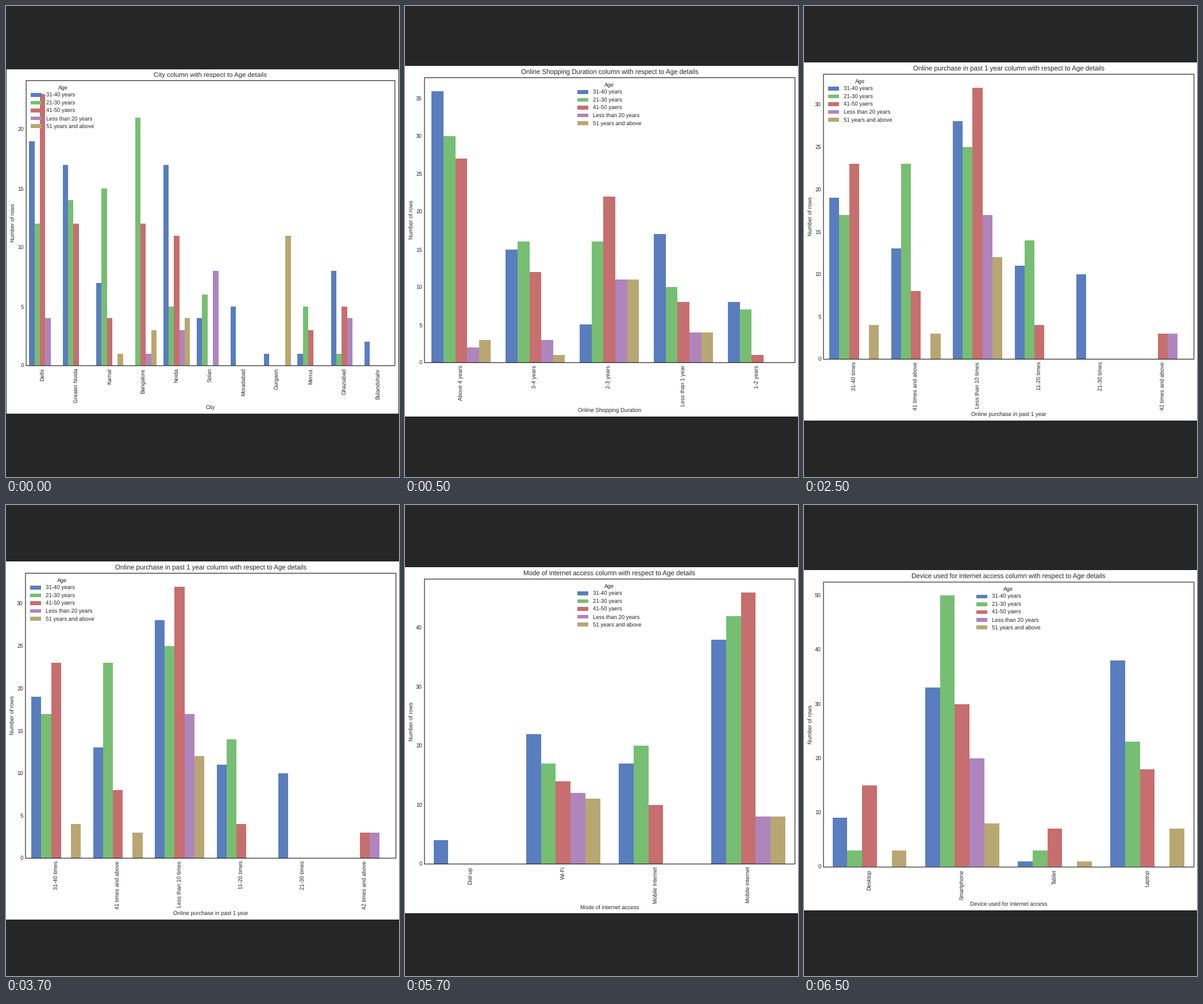
Write a matplotlib script that moves like this. It is 684 px wide and 818 px high and loops after 8 s.

```python
import matplotlib.pyplot as plt
from matplotlib.animation import FuncAnimation
from matplotlib.patches import Rectangle

plt.rcParams["font.family"] = "Liberation Sans"
plt.rcParams["text.hinting"] = "none"

W, H, DPI = 684, 818, 64
PT = 72 / DPI  # points per pixel
DARK = "#262626"
COLORS = ["#597dbe", "#76bf72", "#c76e6e", "#af85be", "#b8a772"]
AGES = ["31-40 years", "21-30 years", "41-50 yaers",
        "Less than 20 years", "51 years and above"]

WIDE = dict(page=(0, 684), left=33.4, width=644.8, size=9.6)
NARROW = dict(page=(1, 682.5), left=34.6, width=641.8, size=9.55)

# One entry per chart; "start" is the half second at which it appears.
CHARTS = [
    dict(NARROW, start=0, name="City", step=5, rows=(109.5, 707.5),
         axes=(129.1, 624.2), legend_x=43, data={
             "Delhi": [19, 12, 23, 4],
             "Greater Noida": [17, 14, 12],
             "Karnal": [7, 15, 4, 0, 1],
             "Bangalore": [0, 21, 12, 1, 3],
             "Noida": [17, 5, 11, 3, 4],
             "Solan": [4, 6, 0, 8],
             "Moradabad": [5],
             "Gurgaon": [1, 0, 0, 0, 11],
             "Merrut": [1, 5, 3],
             "Ghaziabad": [8, 1, 5, 4],
             "Bulandshahr": [2]}),
    dict(WIDE, start=1, name="Online Shopping Duration", step=5,
         rows=(104, 713), axes=(124, 618.9), legend_x=300, data={
             "Above 4 years": [36, 30, 27, 2, 3],
             "3-4 years": [15, 16, 12, 3, 1],
             "2-3 years": [5, 16, 22, 11, 11],
             "Less than 1 year": [17, 10, 8, 4, 4],
             "1-2 years": [8, 7, 1]}),
    dict(WIDE, start=5, name="Online purchase in past 1 year", step=5,
         rows=(98, 720), axes=(118, 612.9), legend_x=42, data={
             "31-40 times": [19, 17, 23, 0, 4],
             "41 times and above": [13, 23, 8, 0, 3],
             "Less than 10 times": [28, 25, 32, 17, 12],
             "11-20 times": [11, 14, 4],
             "21-30 times": [10],
             "42 times and above": [0, 0, 3, 3]}),
    dict(WIDE, start=9, name="Mode of internet access", step=10,
         rows=(107.6, 709.4), axes=(128.1, 623), legend_x=300, data={
             "Dial-up": [4],
             "Wi-Fi": [22, 17, 14, 12, 11],
             "Mobile Internet": [17, 20, 10],
             "Mobile internet": [38, 42, 46, 8, 8]}),
    dict(WIDE, start=13, name="Device used for internet access", step=10,
         rows=(113.2, 703.5), axes=(133.4, 628.3), legend_x=300, data={
             "Desktop": [9, 3, 15, 0, 3],
             "Smartphone": [33, 50, 30, 20, 8],
             "Tablet": [1, 3, 7, 0, 1],
             "Laptop": [38, 23, 18, 0, 7]}),
]

fig = plt.figure(figsize=(W / DPI, H / DPI), dpi=DPI, facecolor=DARK)
ax = fig.add_axes([0, 0, 1, 1])


def box(x, y, w, h, color):
    ax.add_patch(Rectangle((x, y), w, h, facecolor=color, linewidth=0))


def label(x, y, text, size, ha="center", rotation=0):
    ax.text(x, y, text, fontsize=size * PT, color=DARK, ha=ha, va="baseline",
            rotation=rotation, rotation_mode="anchor")


def draw_legend(x, top, size):
    label(x + 56, top + 15.7, "Age", size)
    for i, (age, color) in enumerate(zip(AGES, COLORS)):
        y = top + 25.6 + 13.45 * i
        box(x, y - 3.4, 19.2, 6.7, color)
        label(x + 26.8, y + 3.4, age, size, "left")


def draw_chart(chart):
    left, width, size = chart["left"], chart["width"], chart["size"]
    top, bottom = chart["axes"]
    page_left, page_right = chart["page"]
    page_top, page_bottom = chart["rows"]
    data = chart["data"]
    peak = max(map(max, data.values()))
    unit = (bottom - top) / (1.05 * peak)
    group = width / len(data)
    middle = left + width / 2

    box(page_left, page_top, page_right - page_left,
        page_bottom - page_top, "white")
    for i, (category, counts) in enumerate(data.items()):
        for j, count in enumerate(counts):
            if count:
                box(left + (i + 0.1 + 0.16 * j) * group, bottom - count * unit,
                    0.16 * group, count * unit, COLORS[j])
        label(left + (i + 0.5) * group + 2.4, bottom + 5, category, size,
              "right", 90)
    # The frame line sits half a pixel right of and below the bar edges.
    ax.add_patch(Rectangle((left + 0.5, top + 0.5), width, bottom - top,
                           fill=False, edgecolor=DARK, linewidth=1.2 * PT,
                           snap=False))

    for tick in range(0, peak + 1, chart["step"]):
        label(left - 3.6, bottom - tick * unit + 4.1, str(tick), size, "right")
    label(middle + 0.3, top - 5.7,
          chart["name"] + " column with respect to Age details", size * 1.2)
    label(middle + 0.3, page_bottom - 7.8, chart["name"], size)
    label(left - 19.8, (top + bottom) / 2, "Number of rows", size, rotation=90)
    draw_legend(chart["legend_x"], top, size)


def update(frame):
    ax.clear()
    ax.set_axis_off()
    ax.set_xlim(0, W)
    ax.set_ylim(H, 0)
    draw_chart([c for c in CHARTS if c["start"] <= frame][-1])
    return []


anim = FuncAnimation(fig, update, frames=16, interval=500, repeat=True,
                     repeat_delay=0, init_func=lambda: update(0))
plt.show()
```
